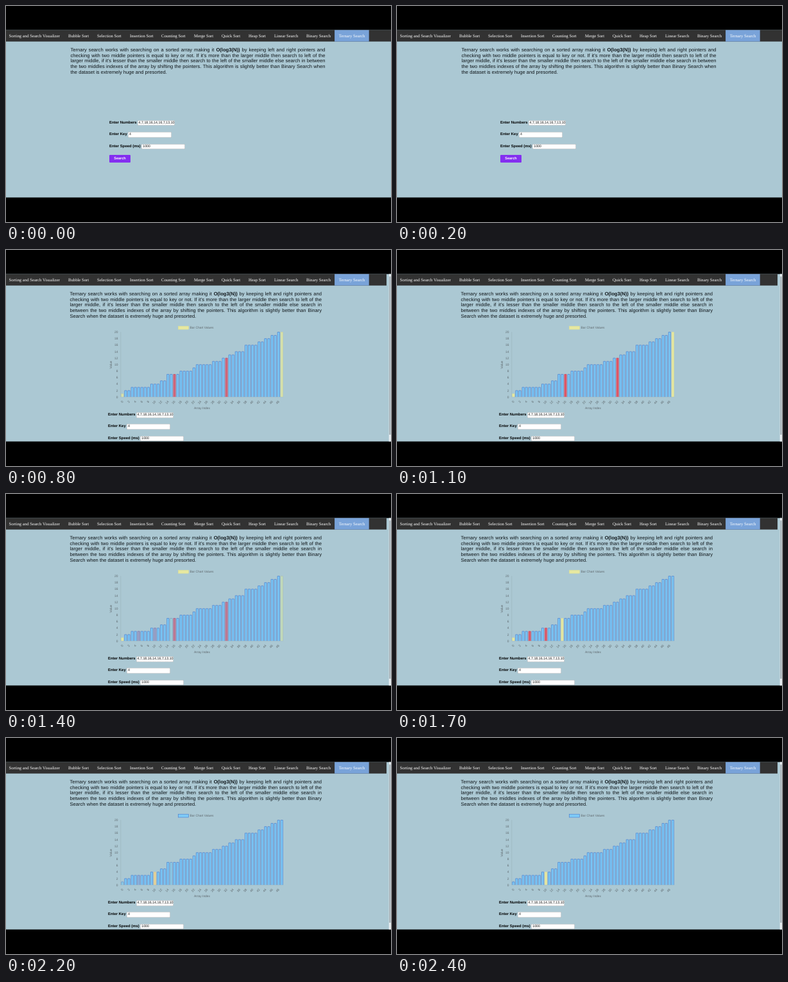
These frames come from a looping animation (600x338 px, 2.5 s). An HTML page:

```html
<!DOCTYPE html>
<html lang="en">
<head>
<meta charset="utf-8">
<title>Ternary Search</title>
<style>
html, body { margin: 0; width: 100%; height: 100%; overflow: hidden; background: #000; }
#stage { position: relative; width: 600px; height: 338px; overflow: hidden; background: #000;
  font-family: "Liberation Sans", Arial, sans-serif; color: #10161a; text-rendering: geometricPrecision; }
svg { position: absolute; left: 0; top: 0; }
#view { position: absolute; left: 0; top: 38px; width: 600px; height: 262px; overflow: hidden; }
#view div, #view b.label { position: absolute; white-space: nowrap; }
.line { height: 8.8px; font-size: 7.6px; line-height: 8.8px; text-align-last: justify; }
.line:last-child { text-align-last: left; }
.label { font-size: 5.95px; line-height: 8px; color: #000; }
.field { box-sizing: border-box; height: 8.6px; padding-left: 1.8px; overflow: hidden; background: #fff;
  box-shadow: inset 0 0 0 .5px #a3abaf; font-size: 5.3px; line-height: 8.6px; color: #111; }
.button { width: 33.5px; height: 12px; border-radius: 1.2px; background: #842ff0; color: #fff;
  font-weight: bold; font-size: 5.5px; line-height: 12px; text-align: center; }
#frame text { font: 6.7px "Liberation Serif", "Times New Roman", serif; fill: #fff; }
#chart text { font-size: 4.9px; fill: #5f686d; }
</style>
</head>
<body>
<div id="stage">
  <svg id="frame" width="600" height="338"></svg>
  <div id="view"></div>
  <svg id="chart" width="600" height="338"></svg>
</div>
<script>
const LOOP = 2500, STEP = 100, CHART_AT = 600, FADE = 600;
const [view, frame, chart] = ['view', 'frame', 'chart'].map(id => document.getElementById(id));

function add(parent, tag, cls, style, html = '') {
  const el = document.createElement(tag);
  el.className = cls;
  for (const k in style) el.style[k] = style[k] + 'px';
  el.innerHTML = html;
  parent.append(el);
  return el;
}

function draw(parent, tag, attrs, text = '') {
  const el = document.createElementNS('http://www.w3.org/2000/svg', tag);
  for (const k in attrs) el.setAttribute(k, attrs[k]);
  el.textContent = text;
  parent.append(el);
  return el;
}

const rect = (parent, x, y, width, height, fill) => draw(parent, 'rect', { x, y, width, height, fill });

// page, navigation bar and scrollbar
const TOP = 37.6, NAV = 18;
rect(frame, 0, TOP, 600, 262, '#abc8d3');
const bar = rect(frame, 0, TOP, 600, NAV, '#323232');
rect(frame, 512.1, TOP, 53.6, NAV, '#79a3d9');
const links = [['Sorting and Search Visualizer', 4.5], ['Bubble Sort', 97], ['Selection Sort', 142],
  ['Insertion Sort', 193], ['Counting Sort', 242], ['Merge Sort', 293], ['Quick Sort', 336],
  ['Heap Sort', 378], ['Linear Search', 418], ['Binary Search', 468], ['Ternary Search', 518.7]];
for (const [name, x] of links) draw(frame, 'text', { x, y: 49 }, name);
rect(chart, 596.7, TOP, 3.3, 262, '#e6edf0');
rect(chart, 597.2, 41.5, 2.3, 247.5, '#a5b1b7');

const intro = [
  'Ternary search works with searching on a sorted array making it <b>O(log3(N))</b> by keeping left and right pointers and',
  "checking with two middle pointers is equal to key or not. If it's more than the larger middle then search to left of the",
  "larger middle, if it's lesser than the smaller middle then search to the left of the smaller middle else search in"];
const wideEnd = [
  'the two middles indexes of the array by shifting the pointers. This algorithm is slightly better than Binary Search when',
  'the dataset is extremely huge and presorted.'];
const narrowEnd = [
  'between the two middles indexes of the array by shifting the pointers. This algorithm is slightly better than Binary',
  'Search when the dataset is extremely huge and presorted.'];

function page(lines, left, width, formX, formY) {
  const box = add(view, 'div', '', { left: 0, top: 0 });
  const form = add(box, 'div', '', { left: formX, top: formY });
  const rows = [['Enter Numbers', '4,7,18,16,14,16,7,13,10', 43.8, 58.7],
    ['Enter Key', '4', 29.3, 67.3], ['Enter Speed (ms)', '1000', 50.4, 67.3]];
  rows.forEach(([name, value, x, w], i) => {
    const top = i * 18.4;
    add(form, 'b', 'label', { left: 0, top }, name);
    add(form, 'div', 'field', { left: x, top, width: w }, value);
  });
  add(form, 'div', 'button', { left: -.3, top: 54.1 }, 'Search');
  const text = add(box, 'div', '', { left: 0, top: 0 });
  lines.forEach((s, i) => add(text, 'div', 'line', { left, top: 26.7 + i * 8.85, width }, s));
  return box;
}

const start = page([intro[0], intro[1], intro[2] + ' between', ...wideEnd], 100.5, 397, 161, 140.9);
const result = page([...intro, ...narrowEnd], 99.5, 392.5, 159, 216);

// value and how many times it occurs in the sorted array
const runs = [[1, 1], [2, 2], [3, 6], [4, 3], [5, 2], [7, 4], [8, 4], [9, 1], [10, 5], [11, 3], [12, 2],
  [13, 2], [14, 3], [16, 4], [17, 2], [18, 2], [19, 2], [20, 2]];
const values = runs.flatMap(([v, n]) => Array(n).fill(v));
const BASE = 229.8;
const barX = i => 181.4 + i * 5.07;
const barY = v => BASE - v * 5.08;

const palette = {
  plain: { fill: [126, 203, 247], line: [72, 120, 204] },
  edge: { fill: [231, 232, 160], line: [222, 224, 150] },
  mid: { fill: [226, 88, 104], line: [200, 70, 92] }
};
const phases = [
  { at: 0, marks: {} },
  { at: 565, marks: { 0: 'edge', 49: 'edge', 16: 'mid', 32: 'mid' } },
  { at: 1345, marks: { 0: 'edge', 15: 'edge', 5: 'mid', 10: 'mid' } },
  { at: 1980, marks: { 10: 'edge' } }
];

draw(chart, 'path', { d: `M178.8 ${barY(20)}V${BASE}H432`, fill: 'none', stroke: '#0002', 'stroke-width': .5 });
for (let v = 0; v <= 20; v += 2)
  draw(chart, 'text', { x: 174.5, y: barY(v) + 1.9, 'text-anchor': 'end' }, v);
for (let i = 0; i < 50; i += 2)
  draw(chart, 'text', { transform: `translate(${barX(i) + 1.6} 237.4) rotate(-50)`, 'text-anchor': 'end' }, i);
draw(chart, 'text', { x: 305.5, y: 249, 'text-anchor': 'middle' }, 'Array Index');
draw(chart, 'text', { transform: 'translate(165 179.6) rotate(-90)', 'text-anchor': 'middle' }, 'Value');
draw(chart, 'text', { x: 286.5, y: 123.4 }, 'Bar Chart Values');
const key = draw(chart, 'rect', { x: 268.6, y: 119.2, width: 16, height: 4.9, 'stroke-width': .6 });
const bars = values.map((v, i) => draw(chart, 'path',
  { d: `M${barX(i) - 1.6} ${BASE}V${barY(v) + .3}h3.2V${BASE}`, 'stroke-width': .65 }));

const styleOf = (phase, i) => palette[phase.marks[i] || 'plain'];
const mix = (a, b, p) => `rgb(${a.map((v, i) => Math.round(v + (b[i] - v) * p))})`;

function paint(el, from, to, p) {
  el.setAttribute('fill', mix(from.fill, to.fill, p));
  el.setAttribute('stroke', mix(from.line, to.line, p));
}

function render(time) {
  const t = Math.floor((time % LOOP) / STEP) * STEP;
  const searching = t >= CHART_AT;
  start.style.display = searching ? 'none' : '';
  result.style.display = chart.style.display = searching ? '' : 'none';
  bar.setAttribute('width', searching ? 593 : 600);
  if (!searching) return;
  const n = phases.findLastIndex(p => t >= p.at);
  const now = phases[n], before = phases[n - 1];
  const p = 1 - (1 - Math.min(1, (t - now.at) / FADE)) ** 4;
  bars.forEach((el, i) => paint(el, styleOf(before, i), styleOf(now, i), p));
  // the legend takes the first bar's new colour at once
  paint(key, styleOf(now, 0), styleOf(now, 0), 1);
}

const origin = performance.now();
function tick() {
  render(performance.now() - origin);
  requestAnimationFrame(tick);
}
tick();
</script>
</body>
</html>
```
